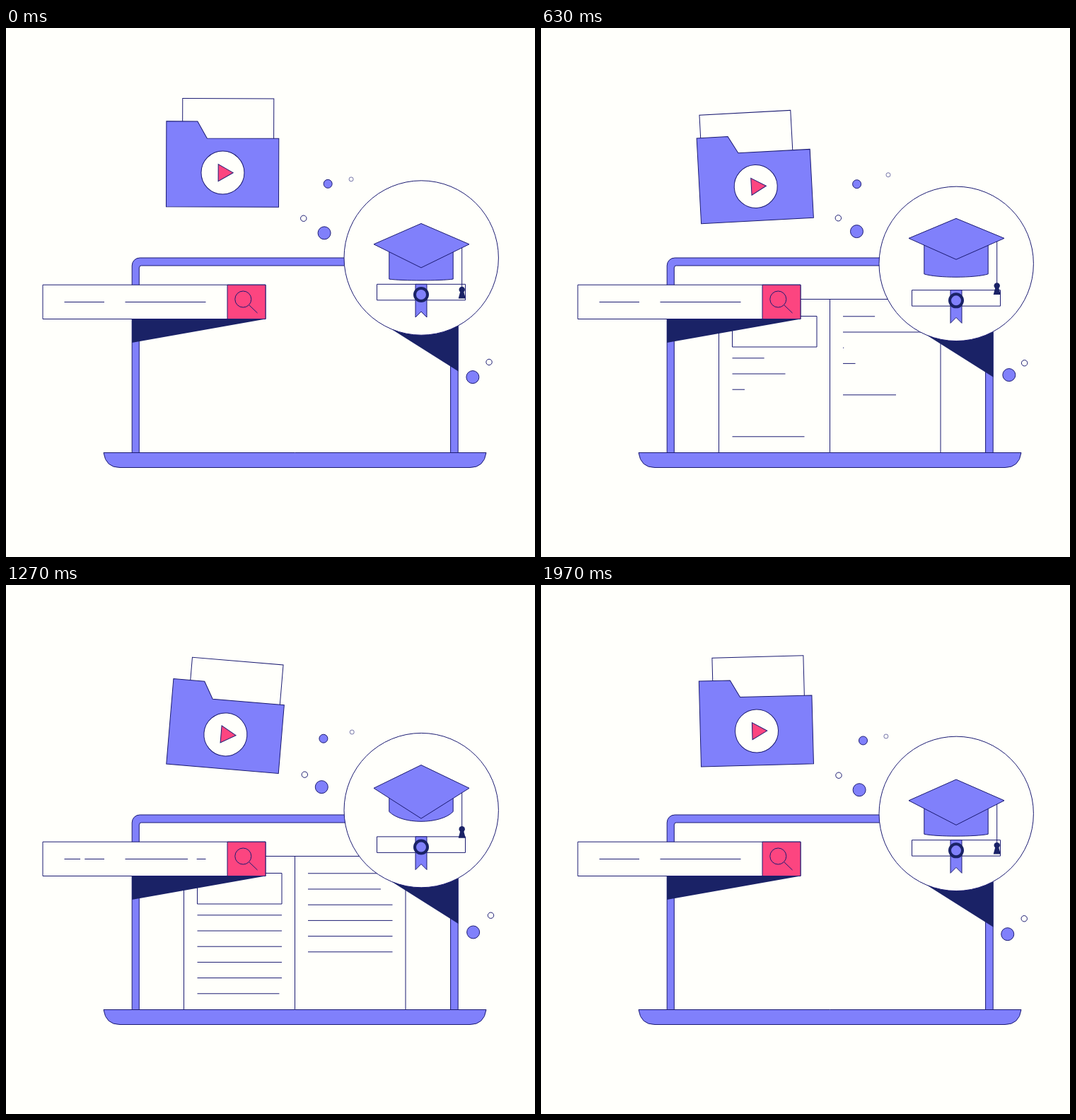
An HTML page with a canvas that plays this animation: 748 px wide and 748 px high, repeating every 2.01 s.

```html
<!DOCTYPE html>
<html>
<head>
<meta charset="utf-8">
<title>Online learning</title>
<style>
html, body { margin: 0; width: 100%; height: 100%; overflow: hidden; background: #fffffb; }
canvas { display: block; }
</style>
</head>
<body>
<canvas id="stage" width="748" height="748"></canvas>
<script>
const c = document.getElementById('stage').getContext('2d');
// The floating motion is cut slightly short of its full cycle by the loop
const LOOP = 2010, CYCLE = 2030, TAU = 2 * Math.PI, RAD = Math.PI / 180;
const WHITE = '#fffffb', PURPLE = '#8080fb', PINK = '#fc4580', NAVY = '#1a2266', INK = '#1b1b72';

const clamp = x => Math.max(0, Math.min(1, x));
const sineEase = x => (1 - Math.cos(Math.PI * clamp(x))) / 2;
const cubicEase = x => (x = clamp(x)) < .5 ? 4 * x ** 3 : 1 - 4 * (1 - x) ** 3;
const smooth = x => x * x * (3 - 2 * x);

// Smooth interpolation through [time, value] keys
function track(t, keys) {
  if (t <= keys[0][0]) return keys[0][1];
  for (let i = 1; i < keys.length; i++) {
    const [t0, a] = keys[i - 1], [t1, b] = keys[i];
    if (t < t1) return a + (b - a) * smooth((t - t0) / (t1 - t0));
  }
  return keys[keys.length - 1][1];
}

function paint(fill, stroke = INK, width = 1) {
  if (fill) { c.fillStyle = fill; c.fill(); }
  if (stroke) { c.strokeStyle = stroke; c.lineWidth = width; c.stroke(); }
}
function poly(points, fill, stroke) {
  c.beginPath();
  points.forEach(([x, y]) => c.lineTo(x, y));
  c.closePath();
  paint(fill, stroke);
}
function box(x, y, w, h, fill) {
  c.beginPath();
  c.rect(x, y, w, h);
  paint(fill);
}
function disc(x, y, r, fill, stroke, width) {
  c.beginPath();
  c.arc(x, y, r, 0, TAU);
  paint(fill, stroke, width);
}
function line(x0, y0, x1, y1) {
  c.beginPath();
  c.moveTo(x0, y0);
  c.lineTo(x1, y1);
  paint();
}
function turn(x, y, deg) {
  c.translate(x, y);
  c.rotate(deg * RAD);
  c.translate(-x, -y);
}
function scoped(draw) {
  c.save();
  draw();
  c.restore();
}

function folder(t) {
  const a = TAU * t * 2 / CYCLE;
  scoped(() => {
    c.translate(306, 263 - 9.9 * Math.cos(a) - 3.4 * Math.sin(a));
    c.rotate((.15 + 4.65 * Math.sin(a)) * RAD);
    box(-63.5 + 10.5 * Math.cos(a - 50 * RAD), -153.4, 129, 80, WHITE);
    poly([[-79.5, 0], [-79.5, -121], [-35.5, -121], [-22, -97], [79.5, -97], [79.5, 0]], PURPLE);
    disc(.3, -48.5, 30.5, WHITE);
    poly([[-6, -60.5], [15, -48.5], [-6, -36.5]], PINK);
  });
}

// Each: centre x, swing, peak time, centre y, swing, peak time, radius, fill
const dots = [
  [450.5, 5.2, -150, 219.3, 2.2, 350, 6, PURPLE],
  [447.7, 2.4, -50, 287.7, 2.3, 110, 9, PURPLE],
  [421.2, 1.2, 1400, 268.7, .6, 150, 4.2, WHITE],
  [489.3, 1.8, 750, 210, 4, -80, 3, WHITE],
  [660.7, 1.2, 750, 491.8, 1.9, -100, 9, PURPLE],
  [684.1, 1.4, 1250, 470.9, 4, 380, 4.2, WHITE]
];

// When each text line starts to erase; it is written again later
const leftLines = [469, 514, 421, 298, 249, 561];
const rightLines = [469, 598, 369, 421, 321, 514];

function textLines(t, x, y, starts) {
  starts.forEach((start, i) => {
    const shown = 1 - sineEase((t - start) / 280) + sineEase((t - start - 461) / 280);
    if (shown > .01) line(x, y + i * 22.2, x + 119.5 * shown, y + i * 22.2);
  });
}

function book(t) {
  const drop = 220 * (1 - cubicEase((t - 27) / 330) + cubicEase((t - 1400) / 330));
  scoped(() => {
    c.beginPath();
    c.rect(188.5, 336, 440, 264.5);
    c.clip();
    c.translate(0, drop);
    box(251.5, 383.5, 313.5, 240, WHITE);
    line(408.5, 383.5, 408.5, 620);
    box(270.5, 407.5, 119.5, 43.5, WHITE);
    textLines(t, 270.5, 466.8, leftLines);
    textLines(t, 427, 407.8, rightLines);
  });
}

const tiltLaptop = deg => turn(640, 625, deg);

function laptop(t, tilt) {
  scoped(() => {
    tiltLaptop(tilt);
    c.beginPath();
    c.roundRect(178.2, 325, 461, 285, [11, 11, 0, 0]);
    paint(PURPLE);
    c.beginPath();
    c.roundRect(188.3, 336, 440.3, 274, [3, 3, 0, 0]);
    paint(WHITE);
    book(t);
    c.beginPath();
    c.moveTo(138, 600.5);
    c.lineTo(679, 600.5);
    c.quadraticCurveTo(676, 621.5, 656, 621.5);
    c.lineTo(161, 621.5);
    c.quadraticCurveTo(141, 621.5, 138, 600.5);
    c.closePath();
    paint(PURPLE);
  });
}

// Shadows fall only on the laptop, whatever its tilt
function shadow(tilt, draw) {
  scoped(() => {
    tiltLaptop(tilt);
    c.beginPath();
    c.rect(178, 325, 461.5, 276);
    c.clip();
    tiltLaptop(-tilt);
    draw();
  });
}

// A short gap runs twice through a line of the search text
function searchLine(t, x, length, start) {
  const pass = (t - start) / 283, end = x + length;
  if (pass < 0 || pass > 2.04) return line(x, 387.5, end, 387.5);
  const from = pass % 1, to = from + .11;
  line(x + length * Math.max(0, to - 1), 387.5, x + length * from, 387.5);
  if (to < 1) line(x + length * to, 387.5, end, 387.5);
}

function searchBar(t, tilt) {
  const angle = track(t, [[120, 0], [250, 2.4], [420, -1.8], [600, 0]]);
  shadow(tilt, () => {
    turn(367, 411.5, angle);
    poly([[367, 411.5], [150, 411.5], [150, 450]], NAVY, null);
  });
  scoped(() => {
    turn(367, 411.5, angle);
    box(52, 363.2, 315, 48.3, WHITE);
    box(313, 363.2, 54, 48.3, PINK);
    searchLine(t, 82.5, 56.5, 875);
    searchLine(t, 168.5, 114, 768);
    turn(355.5, 403, angle * 5.5);
    disc(335.3, 383.5, 11.5);
    line(343.5, 391.5, 355.5, 403);
  });
}

function badge(t, wave, tilt) {
  const y = 325 + 9 * Math.sin(TAU * t / CYCLE);
  shadow(tilt, () => poly([[520, y + 85], [650, y + 167], [650, y + 60]], NAVY, null));
  disc(587.2, y, 109.2, WHITE);

  // Diploma
  box(524.5, y + 37.3, 125, 22.5, WHITE);
  poly([[579, y + 37.3], [595, y + 37.3], [595, y + 84], [587, y + 76], [579, y + 84]], PURPLE);
  disc(587, y + 52, 9, PURPLE, NAVY, 4);

  // Cap
  const side = wave(296.7, 10, 145);
  const top = side - wave(30.2, -2.8, 400);
  const depth = wave(35.8, -7.8, 400);
  const base = wave(340.5, 20, 245);
  const bulge = base + (360.5 - base) * .46;
  c.beginPath();
  c.moveTo(541.8, side);
  c.lineTo(541.8, base);
  c.bezierCurveTo(560, bulge, 614, bulge, 632.2, base);
  c.lineTo(632.2, side);
  c.closePath();
  paint(PURPLE);
  poly([[520, side], [587, top], [655, side], [587, side + depth]], PURPLE);

  // Tassel
  const knot = wave(359.5, 14.3, 240);
  line(644.7, side + depth * .15, 644.7, knot);
  disc(644.7, knot, 4.2, NAVY, null);
  poly([[642.5, knot + 2], [647, knot + 2], [649.8, knot + 12.5], [639.7, knot + 12.5]], NAVY, null);
}

function draw(now) {
  const t = now % LOOP;
  const wave = (mid, swing, peak) => mid + swing * Math.cos(TAU * (t - peak) / CYCLE);
  const tilt = track(t, [[80, 0], [250, 1.66], [380, -.8], [470, 0]]);
  c.fillStyle = WHITE;
  c.fillRect(0, 0, 748, 748);
  folder(t);
  laptop(t, tilt);
  searchBar(t, tilt);
  badge(t, wave, tilt);
  for (const [x, dx, px, y, dy, py, r, fill] of dots)
    disc(wave(x, dx, px), wave(y, dy, py), r, fill, INK, r < 4 ? .6 : 1);
  requestAnimationFrame(() => draw(performance.now()));
}
draw(0);
</script>
</body>
</html>
```
